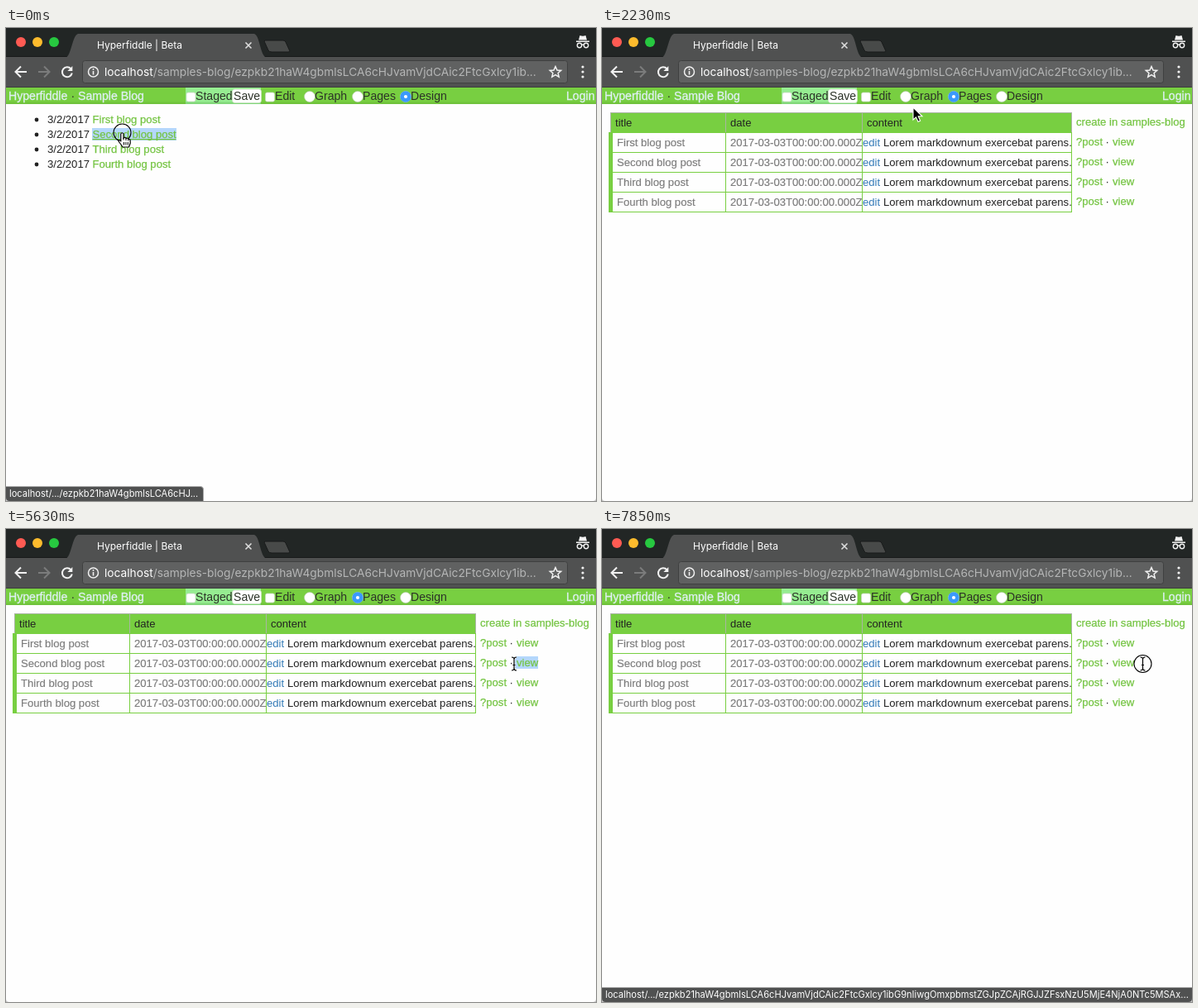
An HTML page that plays this animation: 713 px wide and 572 px high, repeating every 8000 ms.

```html
<!DOCTYPE html>
<html lang="en">
<head>
<meta charset="utf-8">
<title>Browser demo</title>
<style>
  html, body { margin: 0; width: 100%; height: 100%; overflow: hidden; background: #c4c4c4; }
  svg { display: block; width: 713px; height: 572px; }
  text { font: 13.1px "Liberation Sans", Arial, sans-serif; fill: #222; white-space: pre; }
  .ui { font-family: Inter, sans-serif; fill: #fff; }
  .bar { font-size: 14.1px; fill: #2c3328; }
  .brand { fill: #dff0f3; stroke: #dff0f3; stroke-width: .3; }
  .link { fill: #74c442; stroke: #74c442; stroke-width: .25; }
  .cell { fill: #7b7b7b; stroke: #7b7b7b; stroke-width: .15; }
  .edit { fill: #337ab7; }
  .icon { fill: none; stroke: #f2f2f2; stroke-width: 2; }
</style>
</head>
<body>
<svg id="stage" viewBox="0 0 713 572"></svg>
<script>
const GREEN = '#78cf41', PICK = '#b4d7fc';
const URL_TAIL = 'ezpkb21haW4gbmlsLCA6cHJvamVjdCAic2FtcGxlcy1ib';
const posts = ['First', 'Second', 'Third', 'Fourth'].map(n => n + ' blog post');

const text = (x, y, s, cls = '', more = '') => `<text x="${x}" y="${y}" class="${cls}" ${more}>${s}</text>`;
const rect = (x, y, w, h, fill, more = '') => `<rect x="${x}" y="${y}" width="${w}" height="${h}" fill="${fill}" ${more}/>`;
const disc = (x, y, r, fill, more = '') => `<circle cx="${x}" cy="${y}" r="${r}" fill="${fill}" ${more}/>`;
const path = (d, more = '') => `<path d="${d}" ${more}/>`;
const group = (id, body) => `<g id="${id}">${body}</g>`;

function windowFrame() {
  const lights = ['#ff5b53', '#fdbb2d', '#27c840'].map((c, i) => disc(18 + 20 * i, 17, 6, c)).join('');
  const dots = [47, 53, 59].map(y => disc(697, y, 1.6, '#f2f2f2')).join('');
  return rect(0, 0, 713, 36, '#222625') + rect(0, 35, 713, 37, '#505151') +
    rect(0, 34, 713, 1, '#181a1a') + rect(0, 71, 713, 1, '#3c3d3d') + lights +
    path('M72 36C79 34 80 9 87 7H300C307 9 307 34 315 36Z', 'fill="#505151"') +
    path('M313 15H335Q337 15 338 17L343 28Q343 29 341 29H321Q318 29 317 27L312 16Z', 'fill="#484a49" stroke="#181a1a"') +
    text(110, 25, 'Hyperfiddle | Beta', 'ui', 'style="font-size:12px"') +
    path('M289.5 17.5l7 7m0-7l-7 7', 'class="icon" style="stroke:#ddd;stroke-width:1.6"') +
    // incognito badge
    path('M689 15.5H705V17H689ZM692 14.5L693.5 9Q697 10.3 700.5 9L702 14.5Z', 'fill="#f2f2f2"') +
    path('M696 20.5Q697 19.5 698 20.5', 'class="icon" style="stroke-width:1.3"') +
    [693, 701].map(x => disc(x, 21, 2.7, 'none', 'stroke="#f2f2f2" stroke-width="1.4"')).join('') +
    // toolbar
    path('M25 53H12M18 46.5L11.5 53L18 59.5', 'class="icon"') +
    path('M39 53H52M46 46.5L52.500 53L46 59.5', 'class="icon" style="stroke:#7b7c7c"') +
    path('M78.500 49.300A6 6 0 1 0 79.800 54.500', 'class="icon"') +
    path('M80.300 46V52H74.300Z', 'fill="#f2f2f2"') +
    rect(92.5, 39.5, 586, 27, '#606161', 'rx="3" stroke="#3f4040"') +
    disc(105.5, 53, 6, 'none', 'stroke="#f2f2f2" stroke-width="1.5"') +
    rect(104.7, 52, 1.6, 4.5, '#f2f2f2') + rect(104.7, 49, 1.6, 1.8, '#f2f2f2') +
    text(119, 58, `localhost<tspan fill="#b5b6b6">/samples-blog/${URL_TAIL}...</tspan>`, 'ui', 'style="font-size:13.75px"') +
    path('M664 46.500L666 51L670.700 51.400L667.100 54.500L668.200 59.200L664 56.700L659.800 59.200L660.900 54.500L657.300 51.400L662 51Z',
      'class="icon" style="stroke-width:1.5"') + dots;
}

function appBar() {
  const box = x => rect(x, 78, 11, 11, '#fff', 'rx="2" stroke="#c6d6bd" stroke-width=".7"');
  return rect(0, 72, 713, 20, GREEN) + rect(0, 89.500, 713, 2.500, '#70c33c') +
    rect(217, 72, 91, 20, '#96ed91') + rect(217, 89.500, 91, 2.500, '#82d77a') +
    text(3, 87, 'Hyperfiddle', 'bar brand') + text(78.500, 87, '·', 'bar') + text(87, 87, 'Sample Blog', 'bar brand') +
    box(218) + text(229, 87, 'Staged', 'bar') +
    rect(273.5, 74, 35, 16.5, '#fff', 'rx="3" stroke="#cfe0c8" stroke-width=".7"') + text(275, 87, 'Save', 'bar') +
    box(313.5) + text(325, 87, 'Edit', 'bar') +
    [[367, 'Graph'], [425, 'Pages'], [483, 'Design']].map(([x, s]) =>
      disc(x, 83, 6.5, '#fff', 'stroke="#b9c9b0" stroke-width=".6"') + text(x + 6, 87, s, 'bar')).join('') +
    group('radio', disc(0, 83, 6.7, '#3b99fc') + disc(0, 83, 2.1, '#fff')) +
    text(677, 87, 'Login', 'bar brand');
}

const list = () => posts.map((p, i) => {
  const y = 115 + 18 * i;
  return disc(37, y - 4, 2.400, '#222') + text(50, y, '3/2/2017') + text(104.500, y, p, 'link');
}).join('') + group('listLine', rect(104.5, 134, 101, 1.3, '#74c442'));

function grid() {
  const lines = [126, 150, 174, 198, 222].map(y => rect(8, y, 560, 1, GREEN)).join('') +
    [149, 314, 567].map(x => rect(x, 126, 1, 97, GREEN)).join('');
  const heads = [[16, 'title'], [155, 'date'], [320, 'content']].map(([x, s]) => text(x, 119, s)).join('');
  const rows = posts.map((p, i) => {
    const y = 143 + 24 * i;
    return text(18, y, p, 'cell') + text(155, y, '2017-03-03T00:00:00.000Z', 'cell') +
      text(315, y, 'edit', 'edit') + text(340, y, 'Lorem markdownum exercebat parens.') +
      text(573, y - 1, '?post', 'link') + text(608.500, y - 1, '·') + text(617, y - 1, 'view', 'link');
  }).join('');
  return rect(10, 102, 558, 25, GREEN) + rect(10, 102, 558, 1, '#a9b5a2') +
    [10, 149, 314, 567].map(x => rect(x, 102, 1, 24, '#a9b5a2')).join('') +
    lines + rect(8, 126, 5, 97, GREEN) + heads + text(573, 118, 'create in samples-blog', 'link') + rows +
    group('viewLine', rect(617, 167.500, 26, 1.2, '#74c442'));
}

const cursors =
  group('arrow', path('M0 0V15L3.500 11.800L6 17.300L8.600 16.200L6.200 10.800H11Z', 'fill="#000" stroke="#fff" stroke-width="1.1"')) +
  group('beam', path('M-3 -8Q0 -8 0 -5.500Q0 -8 3 -8M0 -6V6M-3 8Q0 8 0 5.500Q0 8 3 8M-1.500 1.500H1.500', 'fill="none" stroke="#fff" stroke-width="2.600"') +
    path('M-3 -8Q0 -8 0 -5.500Q0 -8 3 -8M0 -6V6M-3 8Q0 8 0 5.500Q0 8 3 8M-1.500 1.500H1.500', 'fill="none" stroke="#000" stroke-width="1.2"')) +
  group('hand', path('M-1.700 11V1.500Q0 -1 1.500 1.500V6.500Q3.500 5 4.500 7Q6.500 6 7.300 8Q9.500 7.500 9.700 10V12.500Q9 15 8 17.500H0.500Q-1 15 -4.500 10.500Q-4.500 8 -1.700 10Z',
    'fill="#fff" stroke="#000" stroke-width="1.2"') + path('M2 11.500V15M4.400 11.500V15M6.800 11.500V15M1.500 6.500V9M4.500 7V9.500M7.300 8V10', 'stroke="#000"'));

const stage = document.getElementById('stage');
stage.innerHTML = `<clipPath id="win"><path d="M0 0H713V568Q713 572 709 572H4Q0 572 0 568Z"/></clipPath><g clip-path="url(#win)">` +
  rect(0, 0, 713, 572, '#fefefe') + windowFrame() + appBar() +
  rect(0, 0, 0, 15, PICK, 'id="pick"') + group('list', list()) + group('grid', grid()) +
  group('tip', rect(359, 179, 296, 23, '#000', 'rx="4"') +
    text(366, 194, '{:entity #DbId[17592186045420 17592186045786]}', '', 'style="font-size:12.1px;font-weight:bold;fill:#fff"')) +
  group('status', path('', 'id="statusBox" fill="#505151" stroke="#a5a5a5"') + text(4, 567, '', 'ui', 'id="statusText" style="font-size:11.1px"')) +
  '</g>' + group('pointer', disc(0, 0, 10.500, 'none', 'id="ring" stroke="#000" stroke-width="1.1"') + cursors);

// time, cursor, x, y, marks: R ring, S status, L long status, T tooltip, H link hover; selection [x0, x1, y]
const picks = { first: [104, 206, 121], row: [18, 118, 155], view: [613, 643, 154] };
const part = (key, x0, x1) => [x0, x1, picks[key][2]];
const steps = [
  [0, 'hand', 140.5, 126.5, 'RSH', picks.first],
  [150, 'hand', 140.5, 126.5, 'SH'],
  [590, 'hand', 156, 127, 'SH'],
  [740, 'arrow', 246, 117, ''],
  [890, 'arrow', 345, 104, ''],
  [1040, 'arrow', 408, 97, ''],
  [1190, 'arrow', 426, 95, ''],
  [1340, 'arrow', 426, 84, ''],
  [1630, 'arrow', 426, 84, 'R'],
  [1930, 'arrow', 426, 84, ''],
  [2230, 'arrow', 376, 96, ''],
  [2380, 'arrow', 292, 120, ''],
  [2530, 'beam', 190, 143, ''],
  [2670, 'beam', 110, 157, ''],
  [2820, 'beam', 58, 162, ''],
  [2970, 'beam', 30, 163, ''],
  [3110, 'beam', 19, 162, ''],
  [3260, 'beam', 13, 161, ''],
  [3400, 'beam', 12, 161, 'R'],
  [3550, 'beam', 32, 161, 'R', part('row', 18, 33)],
  [3700, 'beam', 71, 161, 'R', part('row', 18, 70)],
  [3850, 'beam', 108, 162, 'R', part('row', 18, 109)],
  [4000, 'beam', 122, 162, 'R', picks.row],
  [4140, 'beam', 142, 164, '', picks.row],
  [4290, 'beam', 330, 169, '', picks.row],
  [4440, 'arrow', 554, 171, '', picks.row],
  [4590, 'arrow', 632, 171, '', picks.row],
  [4740, 'hand', 640, 164, 'SH', picks.row],
  [4880, 'arrow', 671, 162, '', picks.row],
  [5030, 'beam', 650, 162, 'R'],
  [5180, 'beam', 630, 162, 'R', part('view', 629, 643)],
  [5330, 'beam', 614, 163, 'R', picks.view],
  [5630, 'beam', 614, 163, '', picks.view],
  [5780, 'hand', 622, 164, 'SH', picks.view],
  [5930, 'hand', 624.5, 166, 'STH', picks.view],
  [6380, 'hand', 625, 165, 'STH', picks.view],
  [6670, 'hand', 627, 165, 'STH', picks.view],
  [6820, 'hand', 629, 164, 'STH', picks.view],
  [6960, 'hand', 630, 163, 'STH', picks.view],
  [7110, 'hand', 630.5, 163, 'STH', picks.view],
  [7260, 'hand', 632, 164, 'LTH', picks.view],
  [7410, 'hand', 634, 164, 'LTH', picks.view],
  [7700, 'beam', 653.5, 163, 'L', picks.view],
  [7850, 'beam', 653.5, 163, 'RL']
];

const $ = id => document.getElementById(id);
const show = (id, on) => { $(id).style.display = on ? '' : 'none'; };
const shortUrl = 'localhost/.../' + URL_TAIL.slice(0, 23) + '...';
const longUrl = 'localhost/.../' + URL_TAIL + 'G9nIiwgOmxpbmstZGJpZCAjRGJJZFsxNzU5MjE4NjA0NTc5MSAx...';

function render(ms) {
  const [at, cursor, x, y, marks, pick = [0, 0, 0]] = steps.findLast(s => s[0] <= ms);
  const has = m => marks.includes(m);
  const pages = at >= 2230, wide = has('L');
  show('list', !pages);
  show('grid', pages);
  show('listLine', has('H'));
  show('viewLine', has('H'));
  show('tip', has('T'));
  show('ring', has('R'));
  show('status', has('S') || wide);
  ['arrow', 'beam', 'hand'].forEach(id => show(id, id === cursor));
  $('radio').setAttribute('transform', `translate(${pages ? 425 : 483})`);
  $('pointer').setAttribute('transform', `translate(${x} ${y})`);
  $('pick').setAttribute('x', pick[0]);
  $('pick').setAttribute('width', pick[1] - pick[0]);
  $('pick').setAttribute('y', pick[2]);
  $('statusBox').setAttribute('d', wide ? 'M-1 573V554.5H714V573Z' : 'M-1 573V554.5H235Q238.5 554.5 238.5 558V573Z');
  $('statusText').textContent = wide ? longUrl : shortUrl;
}

const start = performance.now();
function tick() {
  render((performance.now() - start) % 8000);
  requestAnimationFrame(tick);
}
tick();
</script>
</body>
</html>
```
